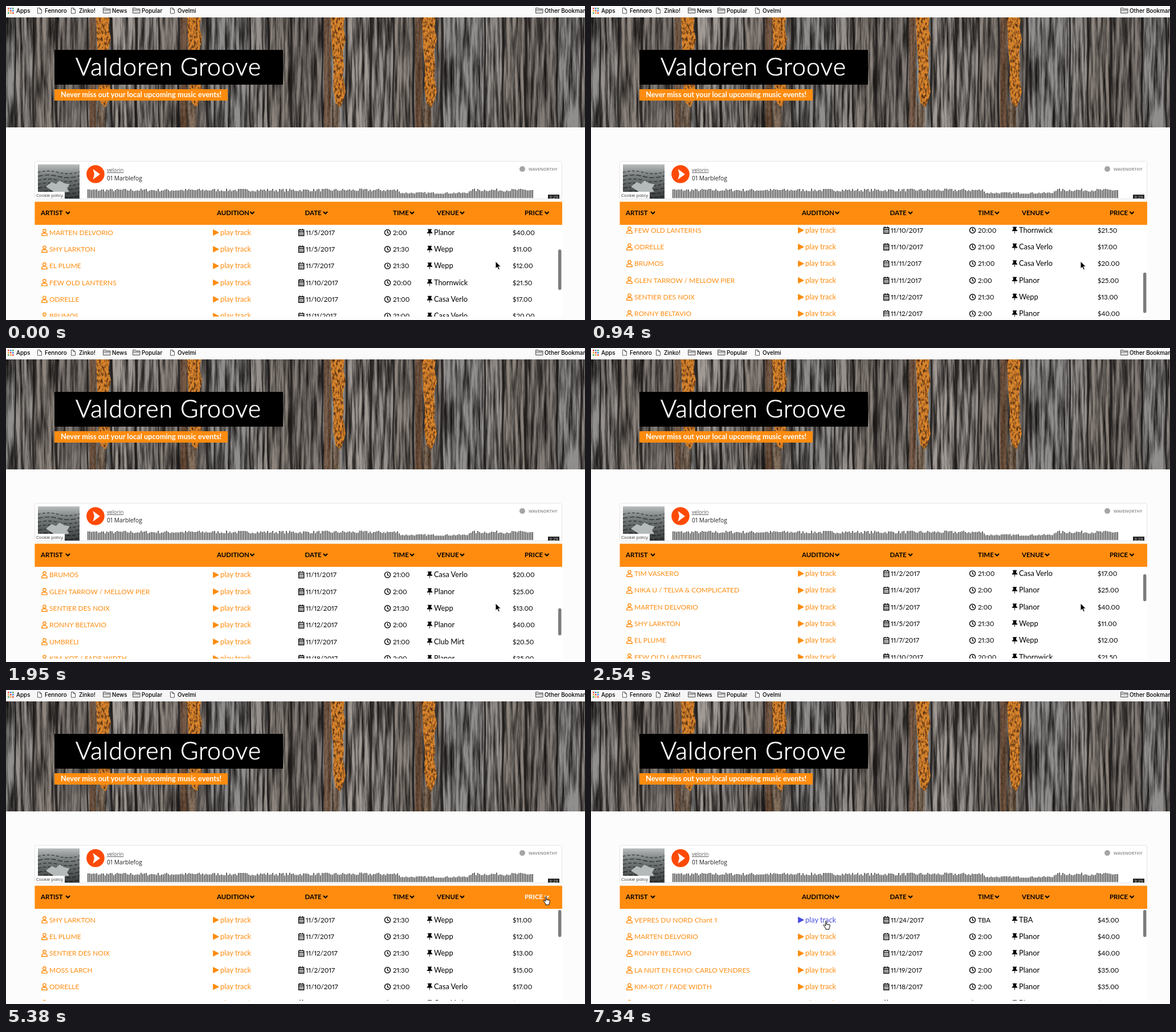
Write an HTML page that moves like this. It is 1016 px wide and 551 px high and loops after 8 s.

```html
<!DOCTYPE html>
<html lang="en">
<head>
<meta charset="utf-8">
<title>Music events</title>
<style>
html, body { margin: 0; width: 100%; height: 100%; overflow: hidden; background: #fcfcfc; }
svg { position: absolute; left: 0; top: 0; will-change: transform; }
text { font-family: Lato, "Open Sans", sans-serif; font-size: 12px; font-variant-numeric: proportional-nums; }
.low { font-size: 12.8px; }
.num { font-size: 11.6px; }
.head { font-size: 11.5px; font-weight: 700; }
.bar { font: 500 9.9px Inter, sans-serif; }
.player { font-family: "Open Sans", sans-serif; }
.line { fill: none; stroke: currentColor; stroke-width: 1.4; }
</style>
</head>
<body>
<svg id="page" width="1016" height="551"></svg>
<svg id="live" width="1016" height="551"></svg>
<script>
const ORANGE = '#ff8c0f', LOOP = 8000, ROW = 29.33, VIEW = 161;

let seed = 7;
const rnd = () => (seed = seed * 16807 % 2147483647) / 2147483647;
const rect = (x, y, w, h, fill, more = '') =>
  `<rect x="${x}" y="${y}" width="${w}" height="${h}" fill="${fill}" ${more}/>`;
const text = (x, y, s, cls = '', more = '') => `<text x="${x}" y="${y}" class="${cls}" ${more}>${s}</text>`;
const mix = (a, b, k) => `color-mix(in srgb, ${a} ${k * 100}%, ${b})`;
const at = (t, keys) => keys.findLast(k => k[0] <= t).slice(1);

// ---- static page ----
const plankEdges = [16, 48, 88, 143, 185, 228, 268, 303, 353, 428];
const TILE = 412;
const eachPlank = draw => {
  let out = '';
  for (let tile = -1; tile < 3; tile++) {
    plankEdges.slice(0, -1).forEach((x, i) => out += draw(x + tile * TILE, plankEdges[i + 1] - x, i));
  }
  return out;
};
const tones = ['#96918d', '#827b76', '#a09994', '#8c847d', '#918f8d'];
const planks = () => eachPlank((x, w, i) => rect(x, 20, w, 193, tones[i * 3 % 5]));
const gaps = () => eachPlank((x, w, i) =>
  `<path d="M${x} 20q2 50 0 97t1 96" fill="none" stroke="#1d1a19" stroke-width="${2.5 + i % 3}" opacity=".85"/>`);

function paint() {
  let out = '';
  for (const x of [-252, -92, 160, 320, 572, 732]) {
    out += rect(x - 14, 20, 12, 193, '#70492c', 'opacity=".6"') + rect(x, 170, 14, 43, '#8a6440', 'opacity=".4"') +
      `<path d="M${x - 2} 20h24l-2 18 4 20-5 22 2 28-2 14 5 28-4 14-5 14-9-8-4-26 1-40-3-30z" fill="#d9852c"/>`;
  }
  return out;
}

function waveform() {
  let d = '';
  for (let x = 144; x < 926; x += 3) {
    const quiet = x > 692 && x < 812;
    d += `M${x} 337v${-((quiet ? 7.5 : 11.5) + rnd() * (quiet ? 3 : 5)).toFixed(1)}`;
  }
  return `<path d="${d}" stroke="#606060" stroke-width="2"/>`;
}

function puzzle() {
  let out = '';
  for (let y = 292; y < 338; y += 7) {
    out += `<path d="M56 ${y}q18-5 36 0t37-1" class="line" stroke-dasharray="${5 + rnd() * 4} 3" opacity=".55"/>`;
  }
  return out;
}

document.getElementById('page').innerHTML = `
<defs>
  <filter id="grain" x="0" y="0" width="1" height="1" color-interpolation-filters="sRGB">
    <feTurbulence type="fractalNoise" baseFrequency=".2 .012" numOctaves="5" seed="5"/>
    <feColorMatrix values="0 0 0 0 .1  0 0 0 0 .09  0 0 0 0 .085  2.1 0 0 0 -.7"/>
  </filter>
  <filter id="flakes" color-interpolation-filters="sRGB">
    <feTurbulence type="fractalNoise" baseFrequency=".3 .16" numOctaves="3" seed="9"/>
    <feColorMatrix values="0 0 0 0 .3  0 0 0 0 .16  0 0 0 0 .07  3 0 0 0 -1.3"/>
    <feComposite in2="SourceGraphic" operator="atop"/>
  </filter>
  <linearGradient id="photo" x2="0" y2="1">
    <stop stop-color="#b9bdbd"/><stop offset=".3" stop-color="#7d8283"/><stop offset="1" stop-color="#363a3b"/>
  </linearGradient>
  <clipPath id="hero"><rect y="20" width="1016" height="193"/></clipPath>
</defs>
<g clip-path="url(#hero)">
  ${planks()}
  ${rect(0, 20, 1016, 193, '#000', 'filter="url(#grain)"')}
  ${gaps()}
  <g filter="url(#flakes)">${paint()}</g>
</g>
${rect(85, 77, 401, 61, '#000')}
${text(122, 122, 'Valdoren Groove', '', 'fill="#fff" stroke="#fff" stroke-width=".7" style="font-size:43px;font-weight:300;letter-spacing:1px"')}
${rect(85, 146, 304, 20, ORANGE)}
${text(96, 160, 'Never miss out your local upcoming music events!', '', 'fill="#fff" style="font-size:12.8px;font-weight:700"')}
${rect(50.5, 272.5, 925, 66, '#fff', 'rx="3" stroke="#e4e4e4"')}
${rect(56, 278, 73, 60, 'url(#photo)')}
${puzzle()}
<path d="M70 317l10-8 8 3 6-6 8 5 10 2-5 7 4 6-14 1-8 4-8-7z" fill="#b4baba"/>
${rect(51, 326, 52, 12, '#fff')}
${text(53, 335, 'Cookie policy', 'player', 'fill="#333" style="font-size:7.7px"')}
<circle cx="157" cy="295" r="15.8" fill="#ff4a05"/>
<path d="M152.5 286l12.5 9.3-12.5 9.3 2.5-9.3z" fill="#fff"/>
${text(177, 291, 'velorin', 'player', 'fill="#555" text-decoration="underline" style="font-size:9.2px"')}
${text(177, 305.5, '01 Marblefog', 'player', 'fill="#222" style="font-size:10.3px"')}
<circle cx="906" cy="286" r="5" fill="#a5a5a5"/>
${text(917, 288.5, 'WAVENORTHY', 'player', 'fill="#999" style="font-size:7.2px;font-weight:700"')}
${waveform()}
${rect(951, 331, 20, 7, '#222')}
${text(953, 338, '3:29', 'player', 'fill="#ccc" style="font-size:8px"')}
${rect(62, 384, 914, 161, '#fff')}`;

// ---- table ----
const events = [
  ['MOSS LARCH', '11/2', '21:30', 'Wepp', '15.00'],
  ['TIM VASKERO', '11/2', '21:00', 'Casa Verlo', '17.00'],
  ['NIKA U / TELVA &amp; COMPLICATED', '11/4', '2:00', 'Planor', '25.00'],
  ['MARTEN DELVORIO', '11/5', '2:00', 'Planor', '40.00'],
  ['SHY LARKTON', '11/5', '21:30', 'Wepp', '11.00'],
  ['EL PLUME', '11/7', '21:30', 'Wepp', '12.00'],
  ['FEW OLD LANTERNS', '11/10', '20:00', 'Thornwick', '21.50'],
  ['ODRELLE', '11/10', '21:00', 'Casa Verlo', '17.00'],
  ['BRUMOS', '11/11', '21:00', 'Casa Verlo', '20.00'],
  ['GLEN TARROW / MELLOW PIER', '11/11', '2:00', 'Planor', '25.00'],
  ['SENTIER DES NOIX', '11/12', '21:30', 'Wepp', '13.00'],
  ['RONNY BELTAVIO', '11/12', '2:00', 'Planor', '40.00'],
  ['UMBRELI', '11/17', '21:00', 'Club Mirt', '20.50'],
  ['KIM-KOT / FADE WIDTH', '11/18', '2:00', 'Planor', '35.00'],
  ['LA NUIT EN ECHO: CARLO VENDRES', '11/19', '2:00', 'Planor', '35.00'],
  ['VEPRES DU NORD Chant 1', '11/24', 'TBA', 'TBA', '45.00'],
];
const byDate = events.map((_, i) => i);
const cheapest = [4, 5, 10, 0, 7, 1];
const dearest = [15, 3, 11, 14, 13, 9];

const row = ([artist, date, time, venue, price], y, playColor) => `<g transform="translate(0 ${y.toFixed(2)})">
  <g color="${ORANGE}" fill="${ORANGE}">
    <circle cx="67.5" cy="-3" r="2.7" class="line"/>
    <path d="M62.8 5.4v-1.4a3 3 0 0 1 3-3h3.4a3 3 0 0 1 3 3v1.4z" class="line"/>
    ${text(76, 4.3, artist)}
  </g>
  <g style="fill:${playColor};stroke:${playColor}">
    <path d="M363.7-5L373.3 0L363.7 5z" stroke-linejoin="round"/>
    ${text(376, 4.3, 'play track', 'low', 'stroke="none"')}
  </g>
  <path d="M513.7-4.5h9v10h-9zM513.7-1.5h9M516-6.5v2.5M520.4-6.5v2.5" class="line"/>
  <path d="M515.4 1h5.8M515.4 3.3h5.8" class="line" stroke-dasharray="1.3 .9"/>
  ${text(526, 4.3, date + '/2017', 'num')}
  <circle cx="669.5" r="5" class="line"/><path d="M669.5-3.2v3.4l2.2 1.4" class="line"/>
  ${text(679, 4.3, time, 'num')}
  <path d="M740-6h7v1.6h-1.1l.4 3.4c1.4.7 2 1.6 2 2.6h-9.6c0-1 .6-1.9 2-2.6l.4-3.4h-1.1zM742.9 2h1.2l-.3 4h-.6z"/>
  ${text(751, 4.3, venue, 'low')}
  ${text(889, 4.3, '$' + price, 'num')}
</g>`;

const heading = (x, arrow, label, color = '#000') => `<g style="color:${color};fill:${color}">
  ${text(x, 367, label, 'head')}
  <path d="M${arrow} 361l3.5 3.5 3.5-3.5" class="line" style="stroke-width:2"/></g>`;

// ---- bookmarks bar ----
const file = x => `<path d="M${x} 3.5h4l3 3v6.5h-7zM${x + 4} 3.5v3h3" fill="#fff" stroke="#555"/>`;
const folder = x => `<path d="M${x} 12.5v-9h4.5l1 1.5h7v7.5zM${x} 7h12.5" fill="#ddd" stroke="#555"/>`;
function appGrid() {
  const colors = ['#e34b3d', '#f2a33a', '#4aa564', '#3d82e0'];
  let out = '';
  for (let i = 0; i < 9; i++) out += rect(3 + i % 3 * 4, 3 + (i / 3 | 0) * 4, 2.6, 2.6, colors[i * 3 % 4]);
  return out;
}
const bookmarks = appGrid() + text(18, 11.5, 'Apps', 'bar') +
  file(55.5) + text(68, 11.5, 'Fennoro', 'bar') + file(114.5) + text(128, 11.5, 'Zinko!', 'bar') +
  folder(170.5) + text(186, 11.5, 'News', 'bar') + folder(222.5) + text(238, 11.5, 'Popular', 'bar') +
  file(288.5) + text(301, 11.5, 'Ovelmi', 'bar') + folder(929.5) + text(945, 11.5, 'Other Bookmarks', 'bar');

const pointers = {
  arrow: '<path d="M0 0v13l3-2.8 2 4.6 2.3-1-2-4.5h4.2z" stroke="#fff"/>',
  hand: '<path d="M3 9L1 7.2c-1-.9-2 .3-1.2 1.2L3.4 13.5V15h6v-1.6c1-1.8 1.3-3 1.3-6 0-1.4-1.7-1.3-1.7 0 0-1.8-2-1.7-2-.3 0-1.6-2-1.6-2-.2V1.5c0-1.6-2-1.6-2 0z" fill="#fff" stroke="#000"/>',
};

// ---- timeline: [time, value...], each held until the next ----
const scrollKeys = [[0, 94], [170, 95], [440, 130.5], [730, 152], [920, 186], [1130, 225], [1330, 257.5], [1500, 264],
  [1950, 240], [2130, 172], [2340, 92], [2540, 37], [2720, 9], [2860, 0]];
const pointerKeys = [[0, 'arrow', 859, 448], [3010, 'arrow', 908, 402], [3150, 'arrow', 951, 363], [3450, 'arrow', 949, 361],
  [3600, 'arrow', 947, 360], [4640, 'hand', 943.5, 362], [6580, 'arrow', 840, 372], [6730, 'arrow', 610, 392],
  [6880, 'arrow', 450, 402], [7040, 'hand', 408.5, 405]];
const priceKeys = [[0, 0], [4640, .25], [4790, .5], [4930, .8], [5080, 1], [6580, .75], [6730, .4], [6880, .1], [7040, 0]];
const playKeys = [[0, 0], [7040, .35], [7190, .75], [7340, 1]];
const orderKeys = [[0, byDate], [5380, cheapest], [6280, dearest]];

function scene(t) {
  const [scroll] = at(t, scrollKeys), [order] = at(t, orderKeys);
  const [price] = at(t, priceKeys), [play] = at(t, playKeys);
  const [shape, px, py] = at(t, pointerKeys);
  const height = (t < 1130 ? 12 : 18) * ROW + 5;
  const rows = order.map((id, i) => {
    const y = 403.5 + i * ROW - scroll;
    return y > 370 && y < 560 ? row(events[id], y, mix('#4a4ee0', ORANGE, i ? 0 : play)) : '';
  }).join('');
  return `<clipPath id="list"><rect x="51" y="384" width="925" height="161"/></clipPath>
    ${rect(0, 0, 1016, 20, t < 3900 ? '#fafafa' : '#f6f6f6')}${bookmarks}
    <g clip-path="url(#list)">${rows}</g>
    ${rect(969, 386 + scroll * 157 / height, 5.5, VIEW * 157 / height, '#7c7c7c', 'rx="2.7"')}
    ${rect(50.5, 343.5, 925.5, 40.5, ORANGE)}
    ${heading(61, 105, 'ARTIST')}${heading(370, 428.5, 'AUDITION')}${heading(524.5, 557, 'DATE')}
    ${heading(679, 709, 'TIME')}${heading(756, 797, 'VENUE')}${heading(910, 945.5, 'PRICE', mix('#fff', '#000', price))}
    <g transform="translate(${px} ${py})">${pointers[shape]}</g>`;
}

const live = document.getElementById('live');
let shown = '';
function frame() {
  const next = scene(performance.now() % LOOP);
  if (next !== shown) live.innerHTML = shown = next;
  requestAnimationFrame(frame);
}
frame();
</script>
</body>
</html>
```
